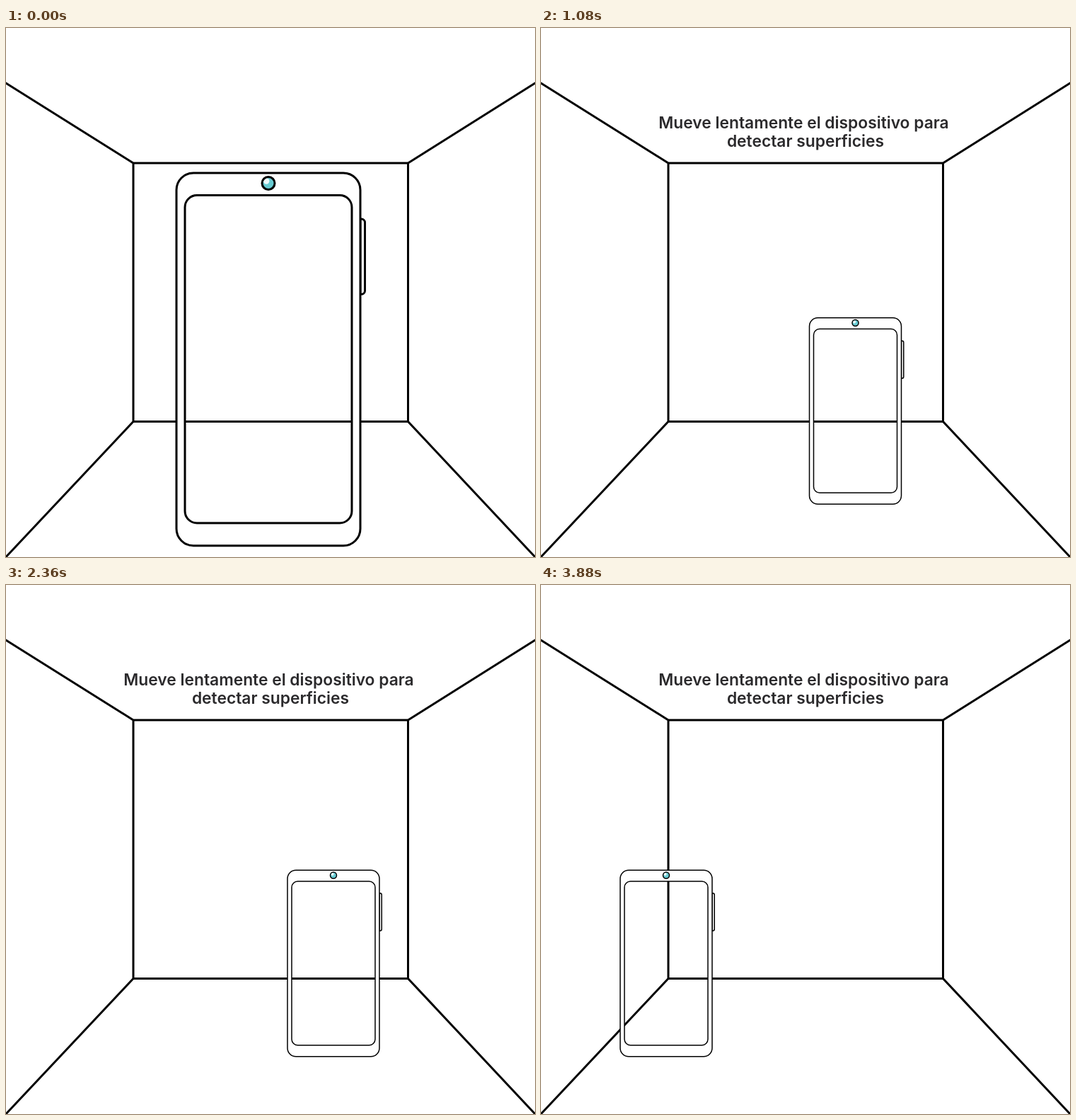
Animation of 748 by 748 pixels, one loop 4.8 s. Source, as an HTML page:

```html
<!DOCTYPE html>
<html lang="es">
<head>
<meta charset="utf-8">
<title>Detectar superficies</title>
<style>
  html, body { margin: 0; width: 100%; height: 100%; overflow: hidden; background: #fff; }
  svg { display: block; width: 100vw; height: 100vh; }
  .line { fill: none; stroke: #000; stroke-width: 3; stroke-linejoin: round; }
  .solid { fill: #fff; }
  text { font: 600 22.8px Inter, "Open Sans", sans-serif; fill: #2b2a2c; text-anchor: middle; }
</style>
</head>
<body>
<svg viewBox="0 0 748 748">
  <path class="line" d="M180 191H568.5V556.5H180ZM-2 76.8L180 191M750 76.8L568.5 191M-2 750L180 556.5M750 750L568.5 556.5"/>
  <g id="label">
    <text x="371.5" y="142">Mueve lentamente el dispositivo para</text>
    <text x="374" y="168">detectar superficies</text>
  </g>
  <g id="phone">
    <path class="line solid" d="M130 -198.5h1.5a5 5 0 0 1 5 5v96.500a5 5 0 0 1 -5 5h-1.500z"/>
    <path id="body" class="line solid" fill-rule="evenodd"/>
    <circle cy="-249" r="9" fill="#67cbd2"/>
    <circle cx="-2.800" cy="-252" r="4.200" fill="#eefafb"/>
    <circle class="line" cy="-249" r="9"/>
  </g>
</svg>
<script>
  const LOOP = 4800, STEP = 40;
  const label = document.getElementById('label');
  const phone = document.getElementById('phone');

  // time, centre x, centre y, scale
  const KEYS = [
    [0, 371, 468.5, 1],
    [600, 371, 516, 0.5],
    [660, 371, 517.2, 0.5],
    [1140, 455, 545, 0.5],
    [1760, 564.5, 535, 0.5],
    [2880, 375, 535, 0.5],
    [3880, 177, 535, 0.5]
  ];

  function roundRect(x, y, w, h, r) {
    const arc = (dx, dy) => `a${r} ${r} 0 0 1 ${dx} ${dy}`;
    return `M${x + r} ${y}h${w - 2 * r}${arc(r, r)}v${h - 2 * r}${arc(-r, r)}` +
      `h${2 * r - w}${arc(-r, -r)}v${2 * r - h}${arc(r, -r)}z`;
  }

  function pose(t) {
    const last = KEYS[KEYS.length - 1];
    if (t >= last[0]) return last.slice(1);
    const i = KEYS.findIndex(k => k[0] > t);
    const a = KEYS[i - 1], b = KEYS[i];
    const p = (t - a[0]) / (b[0] - a[0]);
    return a.slice(1).map((v, n) => v + (b[n + 1] - v) * p);
  }

  function draw(t) {
    const [x, y, s] = pose(t);
    phone.setAttribute('transform', `translate(${x} ${y}) scale(${s})`);
    const grow = Math.min(1, t / 600);
    label.setAttribute('visibility', grow ? 'visible' : 'hidden');
    label.setAttribute('transform',
      `translate(371.5 148) scale(${grow}) translate(-371.5 -148)`);
  }

  function tick() {
    draw(Math.floor(performance.now() % LOOP / STEP) * STEP);
    requestAnimationFrame(tick);
  }

  document.getElementById('body').setAttribute('d',
    roundRect(-130, -263.5, 260, 527, 24) + roundRect(-118, -232, 236, 463.5, 17));
  tick();
</script>
</body>
</html>
```
